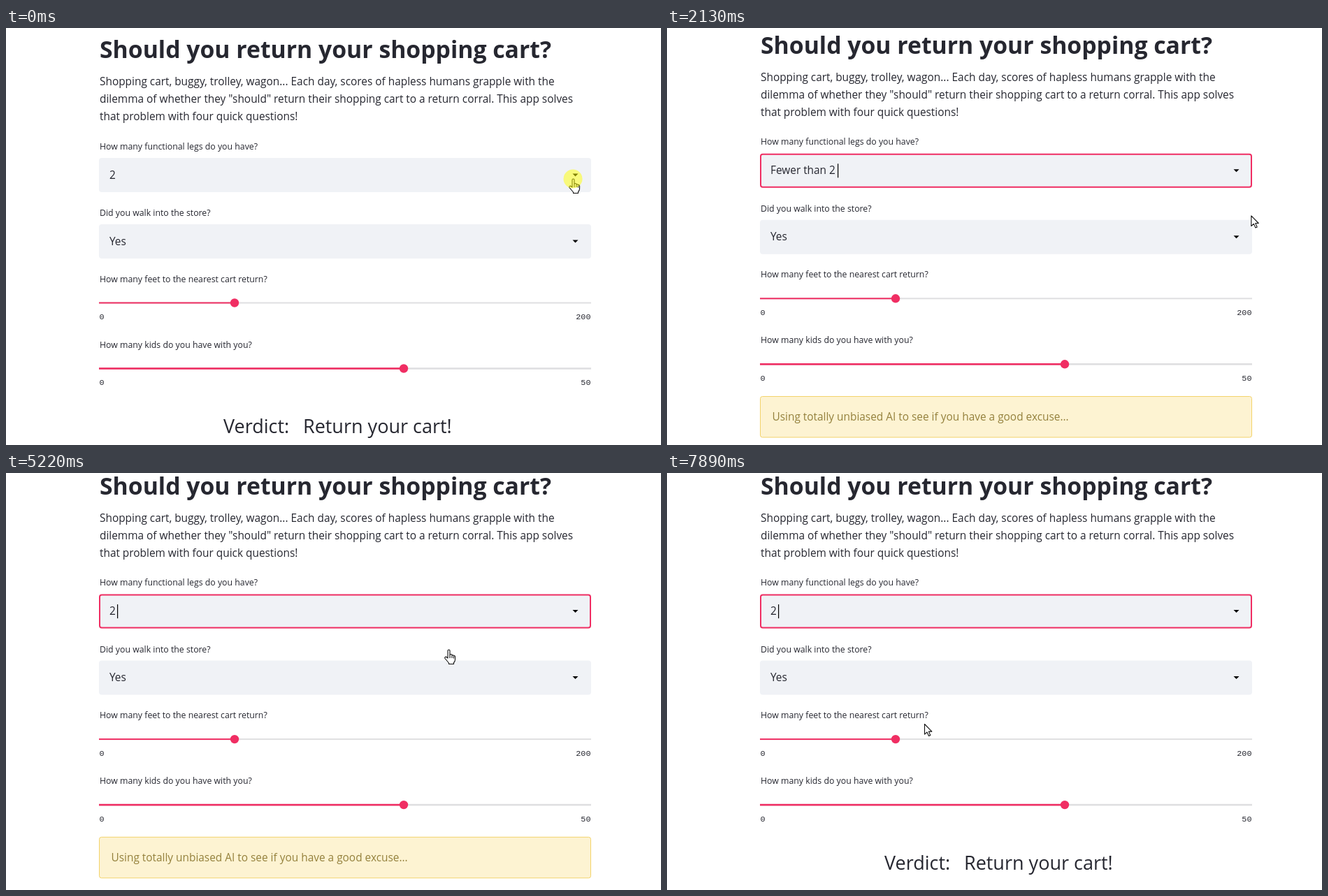
Write an HTML page that moves like this. It is 937x597 px and loops after 7.99 s.

```html
<!DOCTYPE html>
<html lang="en">
<head>
<meta charset="utf-8">
<title>Shopping cart app</title>
<style>
  html, body { margin: 0; width: 100%; height: 100%; overflow: hidden; background: #fff; }
  svg { display: block; width: 100%; height: 100%; }
  text { font: 15.4px "Open Sans", "Noto Sans", sans-serif; fill: #262730; white-space: pre; }
  .title { font-size: 33.75px; font-weight: 700; }
  .label { font-size: 12.3px; }
  .mono { font: 11.8px "Liberation Mono", monospace; }
  .option { font-weight: 500; fill: #a3a5b0; }
  .verdict { font-size: 27px; }
  .field { fill: #f0f2f6; }
  .accent { fill: #f02e63; }
  #menu rect { fill: #fff; filter: drop-shadow(0 3px 7px rgba(0, 0, 0, .24)); }
  #focus { fill: none; stroke: #f02e63; stroke-width: 2; }
  #warning rect { fill: #fdf3d2; stroke: #f3d36b; }
  #warning text { fill: #94803c; }
  .pointer { fill: #fff; stroke: #111; stroke-width: 1.1; stroke-linejoin: round; }
  #ibeam { fill: none; }
</style>
</head>
<body>
<svg viewBox="0 0 937 597">
  <g id="page"></g>
  <g id="cursor">
    <path id="arrow" class="pointer" d="M0 0V14.6L3.5 11.5L6 17L8.3 16L5.9 10.6H10.4Z"/>
    <path id="hand" class="pointer" d="M-1 12V1.5a1.5 1.5 0 0 1 3 0V8a1.5 1.5 0 0 1 3 0a1.5 1.5 0 0 1 2.5 .8a1.3 1.3 0 0 1 2 1.2V14q0 3-2 4.5V20.5H.5V19L-5 12.5a1.5 1.5 0 0 1 2.2-2ZM2 8v4M5 8.5v3.5M7.5 9.5v3"/>
    <path id="ibeam" class="pointer" d="M-3-7.5H-1L0-6.5L1-7.5H3M0-6.5V6.5M-3 7.5H-1L0 6.5L1 7.5H3"/>
    <circle id="click" r="13.5" fill="#ff0" opacity=".5"/>
  </g>
</svg>
<script>
const LOOP = 7990;
const $ = id => document.getElementById(id);

const text = (x, y, content, cls = '', attrs = '') =>
  `<text x="${x}" y="${y}" class="${cls}" ${attrs}>${content}</text>`;
const label = (y, content) => text(134, y, content, 'label');
const select = (y, value, id) =>
  `<rect class="field" x="133" y="${y}" width="704" height="49" rx="4"/>` +
  text(148, y + 29.5, value, '', `id="${id}"`) +
  `<path d="M810.5 ${y + 22.5}h8l-4 4z"/>`;
const slider = (y, knob, max, weight) =>
  `<rect x="133" y="${y - weight / 2}" width="704" height="${weight}" fill="#dfdfe1"/>
   <rect class="accent" x="133" y="${y - weight / 2}" width="${knob - 133}" height="${weight}"/>
   <circle class="accent" cx="${knob}" cy="${y}" r="6.2"/>` +
  text(133.5, y + 23.5, 0, 'mono') +
  text(836.5, y + 23.5, max, 'mono', 'text-anchor="end"');

$('page').innerHTML =
  text(134, 43, 'Should you return your shopping cart?', 'title') +
  text(134, 82, 'Shopping cart, buggy, trolley, wagon... Each day, scores of hapless humans grapple with the') +
  text(134, 107, 'dilemma of whether they "should" return their shopping cart to a return corral. This app solves') +
  text(134, 132, 'that problem with four quick questions!') +
  label(173.5, 'How many functional legs do you have?') + select(186, '2', 'legs') +
  label(269, 'Did you walk into the store?') + select(281, 'Yes', 'walked') +
  label(363.5, 'How many feet to the nearest cart return?') + slider(393.5, 327, 200, 2) +
  label(457.5, 'How many kids do you have with you?') + slider(487.5, 569, 50, 2.6) +
  `<rect id="focus" x="134" y="187" width="702" height="47" rx="3"/>
   <rect id="caret" y="200.5" width="1.2" height="20"/>
   <g id="menu"><rect x="133" y="234" width="703" height="97" rx="3"/>` +
  text(149, 267.5, '2', 'option') + text(149, 308, 'Fewer than 2', 'option') + '</g>' +
  '<g id="verdict">' + text(311, 580, 'Verdict:', 'verdict') +
  text(425, 580, '', 'verdict', 'id="answer"') + '</g>' +
  '<g id="warning"><rect x="133.5" y="533.7" width="703" height="58.5" rx="3"/>' +
  text(150.5, 568.3, 'Using totally unbiased AI to see if you have a good excuse...') + '</g>';

// Cursor hotspot: time, x, y, shape used from then on
const path = [
  [0, 811, 216, 'hand'], [300, 811, 216, 'hand'], [840, 748, 258, 'hand'],
  [940, 738, 266, 'hand'], [1240, 738, 290, 'hand'], [1640, 740, 302, 'hand'],
  [1840, 740, 302, 'arrow'], [2130, 879, 254, 'arrow'], [2630, 918, 247, 'arrow'],
  [3040, 918, 247, 'arrow'], [3390, 815, 208, 'hand'], [3590, 815, 208, 'ibeam'],
  [4120, 773, 219.5, 'ibeam'], [4220, 738, 228, 'ibeam'], [4320, 728, 236, 'hand'],
  [4900, 640, 254, 'hand'], [5120, 633, 253, 'hand'], [5220, 633, 253, 'arrow'],
  [5340, 633, 253, 'arrow'], [5700, 852, 250, 'arrow'], [5860, 836, 256, 'arrow'],
  [6390, 815, 275, 'hand'], [6690, 800, 295, 'hand'], [6890, 760, 318, 'arrow'],
  [7490, 421, 363, 'arrow'], [7890, 361, 359, 'arrow'], [LOOP, 361, 359, 'arrow']
];
const clicks = [[0, 200], [1740, 1840], [3490, 3590], [5120, 5220]];
const menuOpen = [[240, 1840], [3590, 5220]];
const thinking = [[1940, 2640], [5220, 5840]];
const caretOn = [[400, 840], [1240, 2330], [3140, 3590], [4040, 4520], [5020, 6400], [7640, LOOP]];

const during = (spans, t) => spans.some(([from, to]) => t >= from && t < to);
const show = (id, on) => $(id).style.display = on ? '' : 'none';

function cursorAt(t) {
  const next = Math.max(1, path.findIndex(key => key[0] > t));
  const [t0, x0, y0, shape] = path[next - 1], [t1, x1, y1] = path[next];
  const k = (t - t0) / (t1 - t0);
  return { x: x0 + (x1 - x0) * k, y: y0 + (y1 - y0) * k, shape };
}

function render(t) {
  const fewer = t >= 1840 && t < 5220;
  const scroll = t < 1940 ? 0 : t < 5220 ? 6.2 : 12.4;
  const busy = during(thinking, t);
  $('page').setAttribute('transform', `translate(0 ${-scroll})`);
  $('legs').textContent = fewer ? 'Fewer than 2' : '2';
  $('answer').textContent = t >= 1940 && t < 5220 ? 'Okay, you get a pass.' : 'Return your cart!';
  $('caret').setAttribute('x', fewer ? 244 : 159);
  show('focus', t >= 240);
  show('caret', during(caretOn, t));
  show('menu', during(menuOpen, t));
  show('warning', busy);
  show('verdict', !busy);

  // The pointer is sampled ten times a second
  const { x, y, shape } = cursorAt(Math.max(0, Math.floor((t - 40) / 100) * 100 + 40));
  $('cursor').setAttribute('transform', `translate(${x} ${y})`);
  for (const id of ['arrow', 'hand', 'ibeam']) show(id, id === shape);
  show('click', during(clicks, t));
}

const start = performance.now();
function tick() {
  render((performance.now() - start) % LOOP);
  requestAnimationFrame(tick);
}
tick();
</script>
</body>
</html>
```
